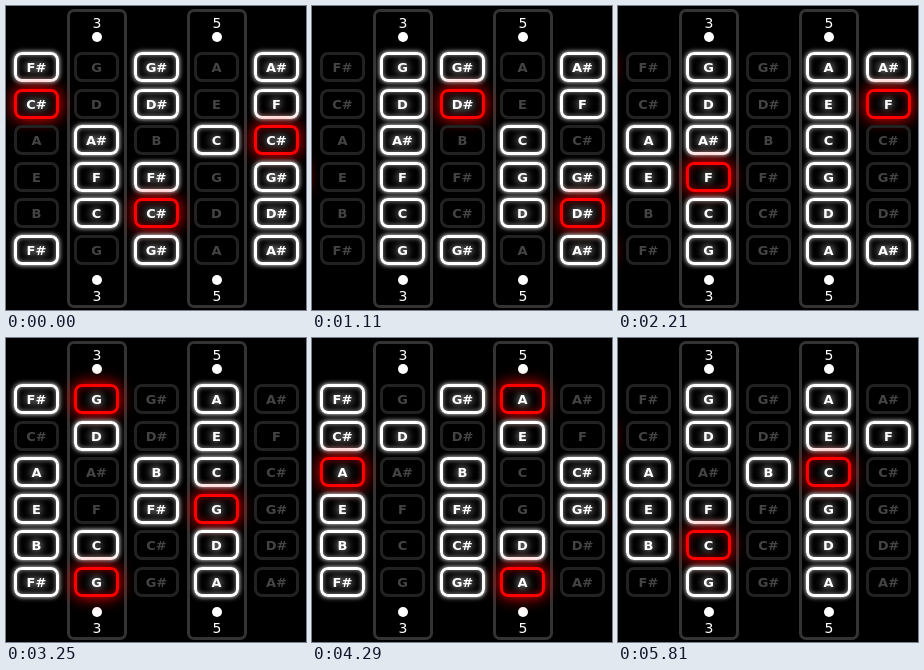
Write an HTML page that moves like this. It is 300x304 px and loops after 6190 ms.

```html
<!DOCTYPE html>
<html lang="en">
<head>
<meta charset="utf-8">
<title>Major scales on the fretboard</title>
<style>
html, body {
  margin: 0;
  width: 100%;
  height: 100%;
  overflow: hidden;
  background: #000;
}
#board {
  position: relative;
  width: 300px;
  height: 304px;
  overflow: hidden;
  font-family: Verdana, "DejaVu Sans", sans-serif;
}
#board * {
  position: absolute;
  box-sizing: border-box;
  text-align: center;
}
.fret {
  top: 3px;
  width: 60px;
  height: 299px;
  border: 3px solid #333;
  border-radius: 7px;
}
.num {
  width: 60px;
  height: 18px;
  font-size: 14px;
  line-height: 18px;
  color: #fff;
}
.dot {
  width: 10px;
  height: 10px;
  border-radius: 50%;
  background: #fff;
}
.key {
  width: 45px;
  height: 30px;
  border: 3px solid #222;
  border-radius: 8px;
  font-size: 13px;
  font-weight: bold;
  line-height: 25px;
  color: #444;
}
.lit {
  border-color: #fff;
  color: #fff;
  box-shadow: 0 0 5px #fff, inset 0 0 5px rgba(255, 255, 255, .6);
  text-shadow: 0 0 8px #fff;
}
.root {
  border-color: #f00;
  box-shadow: 0 0 15px #f00, inset 0 0 8px rgba(255, 0, 0, .5);
}
</style>
</head>
<body>
<div id="board"></div>
<script>
const NOTES = ['C', 'C#', 'D', 'D#', 'E', 'F', 'F#', 'G', 'G#', 'A', 'A#', 'B'];
const MAJOR = [0, 2, 4, 5, 7, 9, 11];
const STRINGS = [4, 11, 7, 2, 9, 4];   // open notes, high to low
const STARTS = [0, 510, 1110, 1670, 2210, 2740, 3250, 3770, 4290, 4720, 5190, 5810];
const LOOP = 6190;
const board = document.getElementById('board');

function add(cls, left, top, text = '') {
  const el = document.createElement('div');
  el.className = cls;
  el.style.left = left + 'px';
  el.style.top = top + 'px';
  el.textContent = text;
  board.append(el);
  return el;
}

for (const fret of [3, 5]) {
  const x = 61 + (fret - 3) * 60;
  add('fret', x, 3);
  add('num', x, 8, fret);
  add('dot', x + 25, 26);
  add('dot', x + 25, 269);
  add('num', x, 281, fret);
}

// The frets just outside the view still cast their glow into it.
const keys = [];
for (let fret = 1; fret <= 7; fret++) {
  STRINGS.forEach((open, row) => {
    const note = (open + fret) % 12;
    const el = add('key', 8 + (fret - 2) * 60, Math.round(46 + row * 36.6), NOTES[note]);
    keys.push({ el, note });
  });
}

function showScale(root) {
  for (const { el, note } of keys) {
    const step = (note - root + 12) % 12;
    el.classList.toggle('lit', MAJOR.includes(step));
    el.classList.toggle('root', step === 0);
  }
}

let shown = -1;
function draw(now) {
  const t = now % LOOP;
  const root = STARTS.filter(s => s <= t).length % 12;
  if (root !== shown) showScale(shown = root);
}

const start = performance.now();
function tick() {
  draw(performance.now() - start);
  requestAnimationFrame(tick);
}
tick();
</script>
</body>
</html>
```
